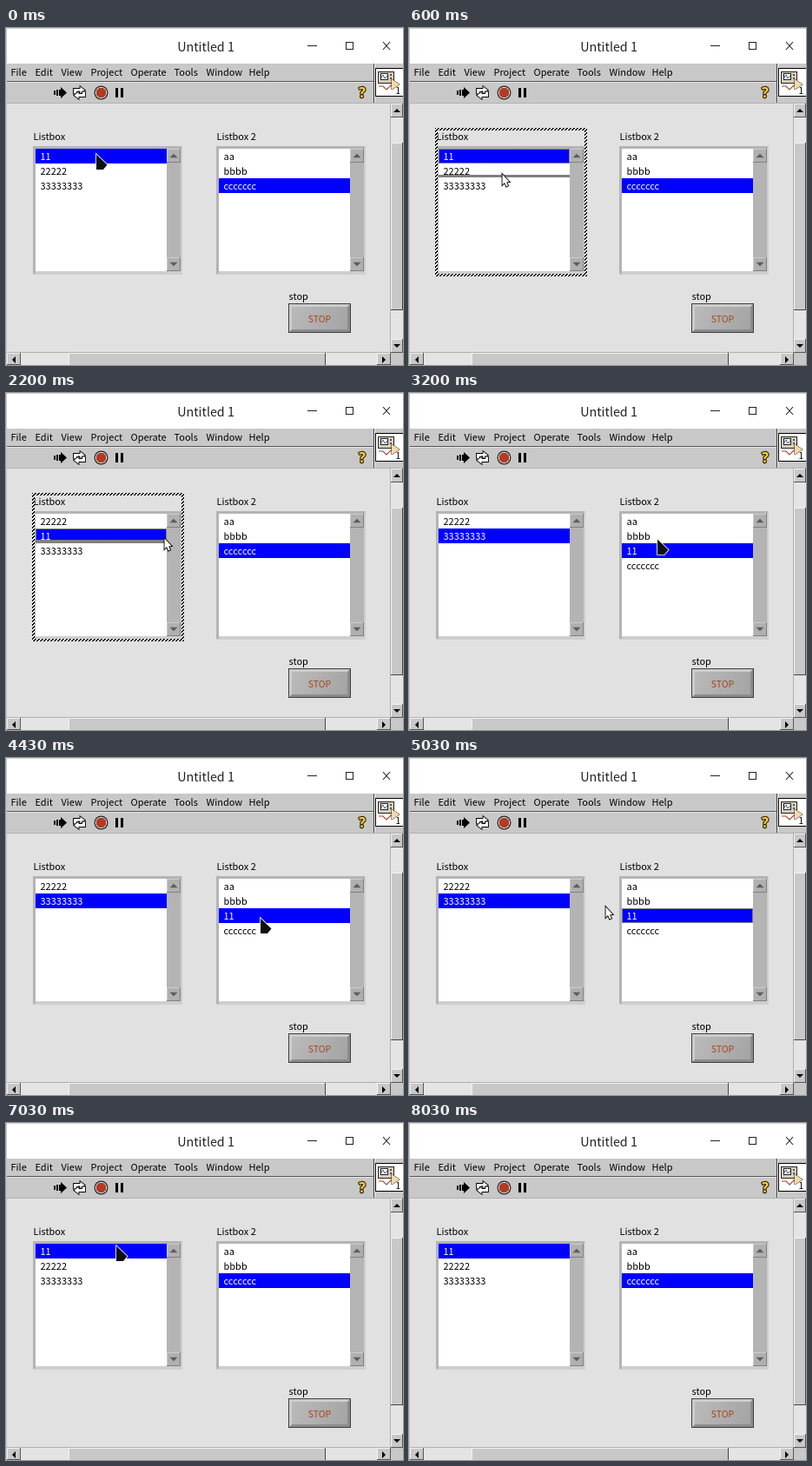
These frames come from a looping animation (457 by 388 pixels, 8.63 s). An HTML page with a canvas:

```html
<!DOCTYPE html>
<html lang="en">
<head>
<meta charset="utf-8">
<title>Listbox drag and drop</title>
<style>
html, body { margin: 0; width: 100%; height: 100%; overflow: hidden; background: #e1e1e1; }
canvas { display: block; width: 457px; height: 388px; }
</style>
</head>
<body>
<canvas id="stage" width="457" height="388"></canvas>
<script>
const canvas = document.getElementById('stage');
const g = canvas.getContext('2d');
const FONT = '"Noto Sans CJK SC", "Noto Sans CJK JP", "Noto Sans CJK", "Noto Sans", sans-serif';
const LOOP = 8630;
const ROW = 17, TOP = 139, LEFT = [34, 245];

// Item order and selected row of both lists
const FIRST = [['11', '22222', '33333333'], 0];
const SWAPPED = [['22222', '11', '33333333'], 1];
const REDUCED = [['22222', '33333333'], 1];
const LETTERS = [['aa', 'bbbb', 'ccccccc'], 2];
const EXTENDED = [['aa', 'bbbb', '11', 'ccccccc'], 2];
const START = [FIRST, LETTERS], SORTED = [SWAPPED, LETTERS], MOVED = [REDUCED, EXTENDED];

// time, pointer x, y, mode, lists, index of the list with the focused row
const STEPS = [
  [0, 104, 145, 'point', START, -1],
  [200, 104, 149, 'drag', START, 0],
  [400, 105, 158, 'drag', START, 0],
  [600, 107, 168, 'drag', START, 0],
  [1000, 107, 169, 'point', SORTED, 0],
  [1200, 115, 168, 'point', SORTED, 0],
  [1400, 140, 167, 'drag', SORTED, 0],
  [1600, 170, 167, 'drag', SORTED, 0],
  [2200, 182, 167, 'drag', SORTED, 0],
  [2400, 222, 167, 'drag', SORTED, 0],
  [2600, 262, 167, 'drag', SORTED, 0],
  [2800, 286, 167, 'drag', SORTED, 0],
  [3200, 286, 168, 'point', MOVED, -1],
  [3600, 290, 176, 'point', MOVED, -1],
  [3800, 294, 185, 'point', MOVED, -1],
  [4230, 293, 185, 'point', MOVED, -1],
  [4430, 293, 184, 'point', MOVED, -1],
  [4830, 288, 182, 'point', MOVED, 1],
  [5030, 226, 171, 'drag', MOVED, 1],
  [5230, 190, 163, 'drag', MOVED, 1],
  [5430, 164, 156, 'drag', MOVED, 1],
  [5630, 140, 150, 'drag', MOVED, 1],
  [5830, 130, 148, 'drag', MOVED, 1],
  [6430, 129, 145, 'drag', MOVED, 1],
  [6630, 127, 143, 'drag', MOVED, 1],
  [7030, 127, 141, 'point', START, -1],
  [7230, 130, 164, 'point', START, -1],
  [7430, 138, 214, 'point', START, -1],
  [7630, 150, 282, 'point', START, -1],
  [7830, 160, 350, 'point', START, -1],
  [8030, 0, 0, 'none', START, -1]
];

function box(x, y, w, h, color) {
  g.fillStyle = color;
  g.fillRect(x, y, w, h);
}

function text(str, x, y, size = 11, color = '#000', align = 'left') {
  g.font = size + 'px ' + FONT;
  g.textAlign = align;
  g.fillStyle = color;
  g.fillText(str, x, y);
}

function shape(points, fill, stroke, width = 1, open = false) {
  g.beginPath();
  for (let i = 0; i < points.length; i += 2) g.lineTo(points[i], points[i + 1]);
  if (!open) g.closePath();
  g.lineWidth = width;
  if (stroke) { g.strokeStyle = stroke; g.stroke(); }
  if (fill) { g.fillStyle = fill; g.fill(); }
}

function disc(x, y, r, color) {
  g.beginPath();
  g.arc(x, y, r, 0, Math.PI * 2);
  g.fillStyle = color;
  g.fill();
}

function bevel(x, y, w, h, face, light, dark) {
  box(x, y, w, h, dark);
  box(x, y, w - 1, h - 1, light);
  box(x + 1, y + 1, w - 2, h - 2, face);
}

function arrow(x, y, angle, size, color) {
  g.save();
  g.translate(x, y);
  g.rotate(angle);
  shape([0, -size / 2, size, size / 2, -size, size / 2], color);
  g.restore();
}

function titleBar() {
  box(0, 0, 457, 41, '#fff');
  box(0, 0, 457, 1, '#d4d4d4');
  text('Untitled 1', 230, 27, 14.3, '#222', 'center');
  box(347, 20, 11, 1, '#222');
  g.lineWidth = 1;
  g.strokeStyle = '#222';
  g.strokeRect(391.5, 16.5, 8, 8);
  shape([434, 16, 442, 25], null, '#222', 1.1, true);
  shape([442, 16, 434, 25], null, '#222', 1.1, true);
}

function menuBar() {
  box(0, 41, 457, 46, '#c8c8c8');
  const items = { File: 6, Edit: 34, View: 64, Project: 98, Operate: 144, Tools: 194, Window: 231, Help: 280 };
  for (const name in items) text(name, items[name] - 0.5, 55);
  box(0, 61, 424, 1, '#555');
  box(0, 62, 424, 1, '#e4e4e4');
  box(0, 86, 457, 1, '#b0b0b0');
  box(423, 41, 1, 45, '#444');
  box(424, 41, 1, 45, '#eee');
}

function toolbar() {
  // running arrow
  box(55, 72, 2, 5, '#000');
  box(58, 71, 2, 7, '#000');
  shape([61, 71, 63, 71, 63, 68, 70, 74.5, 63, 81, 63, 78, 61, 78], '#000');
  // repeat arrows
  for (const turn of [0, Math.PI]) {
    g.save();
    g.translate(84.5, 74.5);
    g.rotate(turn);
    shape([-6.5, 1, -6.5, -4.5, 1, -4.5, 1, -7, 6, -3, 1, 1, 1, -1.5, -3.5, -1.5, -3.5, 1], '#fff', '#000', 1.8);
    g.restore();
  }
  // abort
  disc(109.5, 74.5, 8, '#222');
  disc(109.5, 74.5, 6.8, '#e6d8c8');
  shape([107, 69.5, 112, 69.5, 114.5, 72, 114.5, 77, 112, 79.5, 107, 79.5, 104.5, 77, 104.5, 72], '#b53a26', '#7c1c10', 0.8);
  // pause
  box(126, 69, 3, 11, '#000');
  box(132, 69, 3, 11, '#000');
  // help
  g.font = 'bold 16px "Noto Sans", sans-serif';
  g.textAlign = 'center';
  g.lineJoin = 'round';
  g.lineWidth = 2.4;
  g.strokeStyle = '#3a2c00';
  g.strokeText('?', 410, 80);
  g.fillStyle = '#ffd145';
  g.fillText('?', 410, 80);
  g.lineJoin = 'miter';
}

function panelIcon() {
  box(425, 46, 32, 33, '#000');
  box(426, 47, 31, 31, '#fff');
  box(428, 50, 19, 14, '#222');
  box(429, 51, 17, 12, '#d6cfb8');
  box(431, 52, 9, 8, '#222');
  box(432, 53, 7, 6, '#fff');
  shape([432, 57, 434, 54, 436, 58, 439, 55], null, '#36549a', 1, true);
  box(442, 53, 2, 2, '#555');
  box(442, 57, 2, 2, '#555');
  shape([429, 67, 434, 67, 438, 71, 443, 66, 447, 66], null, '#a6482c', 1.2, true);
  shape([444, 59, 453, 65, 444, 71], '#f3d9a8', '#222', 1);
  text('1', 448.5, 76, 10);
}

function scrollBars() {
  const face = '#c8c8c8', track = '#e4e4e4';
  box(442, 87, 1, 301, '#b0b0b0');
  box(443, 87, 14, 287, track);
  bevel(443, 87, 14, 16, face, '#f2f2f2', '#555');
  arrow(450, 95, 0, 4, '#000');
  bevel(443, 132, 14, 193, face, '#f2f2f2', '#444');
  bevel(443, 358, 14, 16, face, '#f2f2f2', '#555');
  arrow(450, 366, Math.PI, 4, '#000');
  box(0, 373, 443, 1, '#b0b0b0');
  box(0, 374, 443, 14, track);
  bevel(1, 374, 16, 14, face, '#f2f2f2', '#555');
  arrow(9, 382, -Math.PI / 2, 4, '#000');
  bevel(72, 374, 296, 15, face, '#f2f2f2', '#444');
  bevel(427, 374, 16, 14, face, '#f2f2f2', '#555');
  arrow(435, 382, Math.PI / 2, 4, '#000');
  box(443, 374, 14, 14, face);
}

function stopButton() {
  text('stop', 325.5, 313);
  box(325, 317, 72, 34, '#3c3c44');
  box(326, 318, 70, 32, '#8c8c8c');
  shape([326, 318, 396, 318, 392, 322, 330, 322, 330, 346, 326, 350], '#cccccc');
  const shade = g.createLinearGradient(329, 321, 393, 347);
  shade.addColorStop(0, '#bababa');
  shade.addColorStop(1, '#a4a4a4');
  box(329, 321, 64, 26, shade);
  text('STOP', 361, 339, 10.5, '#a3461c', 'center');
}

function listBox(left, label, [items, selected], focused) {
  text(label, left - 2.5, 129);
  box(left - 3, 136, 172, 148, '#cecece');
  box(left - 3, 136, 171, 3, '#b4b4b4');
  box(left - 3, 136, 3, 147, '#b4b4b4');
  box(left, TOP, 151, 141, '#fff');
  items.forEach((item, i) => {
    const y = TOP + i * ROW;
    if (i === selected) {
      box(left, y, 151, ROW, '#0000ff');
      if (focused) {
        g.setLineDash([1, 1]);
        g.lineWidth = 1;
        g.strokeStyle = '#ffff00';
        g.strokeRect(left + 0.5, y + 0.5, 150, ROW - 1);
        g.setLineDash([]);
      }
    }
    text(item, left + 5.5, y + 13, 11, i === selected ? '#fff' : '#000');
  });
  box(left + 151, TOP, 16, 141, '#b4b4b4');
  for (const y of [TOP, 264]) {
    bevel(left + 151, y, 16, 16, '#b0b0b0', '#cdcdcd', '#808080');
    arrow(left + 159, y + 8, y === TOP ? 0 : Math.PI, 4.5, '#5c5c5c');
  }
}

// Striped frame and insertion bar of the list under the dragged item
function dropTarget(left, y) {
  const x0 = left - 4, y0 = 115, w = 175, h = 171;
  for (const [x, top, bw, bh] of [[x0, y0, w, 3], [x0, y0 + h - 3, w, 3], [x0, y0, 3, h], [x0 + w - 3, y0, 3, h]]) {
    box(x, top, bw, bh, stripes);
  }
  const slot = Math.round((y - TOP) / ROW);
  if (slot > 0) box(left, TOP + slot * ROW - 4, 151, 3, '#808080');
}

function pointer(x, y, mode) {
  g.save();
  g.translate(x, y);
  if (mode === 'drag') {
    shape([0.5, 0.5, 0.5, 12.5, 3, 10, 5, 14.5, 7, 13.5, 5.2, 9.5, 8.5, 9], '#fff', '#000', 1.8);
  } else {
    shape([0, 0.5, 0, 18, 8, 18, 12.5, 12.5], '#101014', '#fff', 1.6);
  }
  g.restore();
}

function makeStripes() {
  const tile = document.createElement('canvas');
  tile.width = tile.height = 4;
  const t = tile.getContext('2d');
  for (let i = 0; i < 16; i++) {
    const x = i % 4, y = i >> 2;
    t.fillStyle = (x + y) % 4 < 2 ? '#000' : '#fff';
    t.fillRect(x, y, 1, 1);
  }
  return g.createPattern(tile, 'repeat');
}

const stripes = makeStripes();

function draw(time) {
  const [, x, y, mode, lists, focus] = STEPS.filter(s => s[0] <= time).pop();
  box(0, 0, 457, 388, '#e1e1e1');
  titleBar();
  menuBar();
  toolbar();
  panelIcon();
  stopButton();
  lists.forEach((list, i) => {
    const left = LEFT[i];
    listBox(left, i ? 'Listbox 2' : 'Listbox', list, focus === i);
    if (mode === 'drag' && x >= left - 4 && x < left + 171) dropTarget(left, y);
  });
  if (mode !== 'none') pointer(x, y, mode);
  scrollBars();
  box(0, 0, 1, 388, '#c4c4c4');
}

const began = performance.now();
function tick() {
  draw((performance.now() - began) % LOOP);
  requestAnimationFrame(tick);
}
tick();
</script>
</body>
</html>
```
